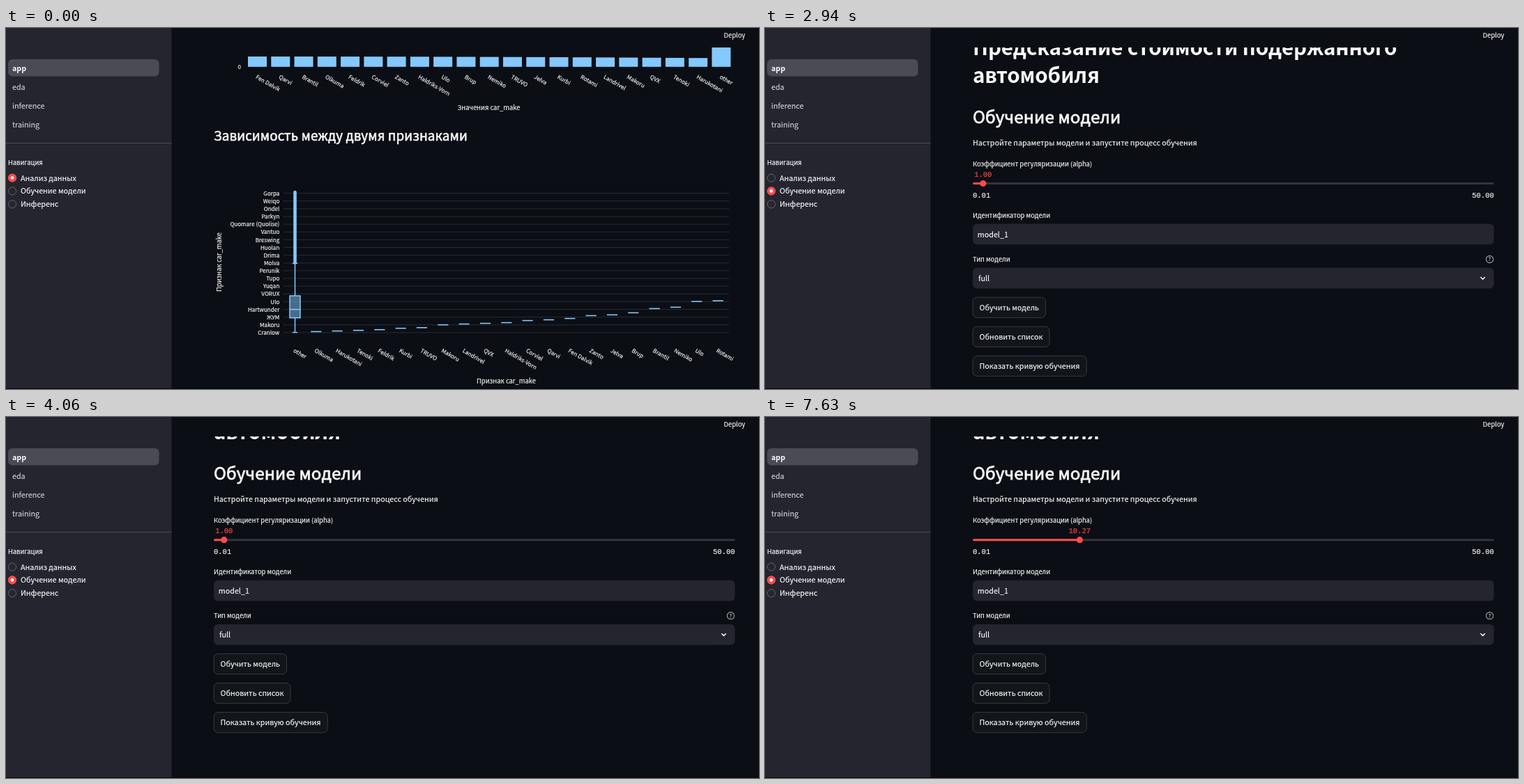
Recreate the animation shown at these times as an HTML page. Size 1080 px wide and 519 px high, loop 8000 ms.

```html
<!DOCTYPE html>
<html lang="ru">
<head>
<meta charset="utf-8">
<title>Анализ данных</title>
<style>
  html, body { margin: 0; width: 100%; height: 100%; overflow: hidden; background: #0b0e14; }
  svg { display: block; width: 1080px; height: 519px; }
  text { font-family: "Noto Sans CJK JP", "Noto Sans CJK SC", "Noto Sans", sans-serif;
         fill: #fafafa; stroke: #fafafa; stroke-width: .15px; white-space: pre; }
  .mono { font-family: "Liberation Mono", monospace; }
  .red { fill: #ff4b4b; stroke: #ff4b4b; }
  .dim { fill: #cfd0d4; stroke: #cfd0d4; }
  .head { stroke-width: .032em; letter-spacing: .005em; }
  .title { font-weight: 700; stroke: none; letter-spacing: -.005em; }
  .bold { font-weight: 700; stroke: none; }
</style>
</head>
<body>
<svg id="stage" viewBox="0 0 1080 519"></svg>
<script>
const NS = 'http://www.w3.org/2000/svg';
const LOOP = 8000, TICK = 70;
const BLUE = '#83c9ff', RED = '#ff4b4b', PANEL = '#24252f';
const GLYPH_SCALE = 1 / 1.117;
const stage = document.getElementById('stage');

function add(parent, tag, attrs = {}, content) {
  const node = document.createElementNS(NS, tag);
  for (const key in attrs) node.setAttribute(key, attrs[key]);
  if (content !== undefined) node.textContent = content;
  parent.appendChild(node);
  return node;
}
const rect = (p, x, y, width, height, fill, extra) =>
  add(p, 'rect', { x, y, width, height, fill, ...extra });
const line = (p, x1, y1, x2, y2, stroke, width = 1, extra) =>
  add(p, 'line', { x1, y1, x2, y2, stroke, 'stroke-width': width, ...extra });
const label = (p, x, y, size, content, extra) =>
  add(p, 'text', { x, y, 'font-size': size * GLYPH_SCALE, ...extra }, content);
const mono = (p, x, y, content, anchor, cls = '') =>
  add(p, 'text', { x, y, 'font-size': 10.5, class: 'mono ' + cls, 'text-anchor': anchor }, content);
const slanted = (p, x, y, content) =>
  label(p, 0, 0, 9, content, { transform: `translate(${x - 3} ${y}) rotate(30)` });

// Page area below the fixed header
const clip = add(add(stage, 'defs'), 'clipPath', { id: 'below' });
rect(clip, 238, 28, 842, 491);
const main = add(stage, 'g', { 'clip-path': 'url(#below)' });
const charts = add(main, 'g');
const form = add(main, 'g');

function drawBars() {
  const names = ['Fen Dalvik', 'Qarvi', 'Brantil', 'Olkuma', 'Feldrik', 'Corviel', 'Zanto',
    'Haldriks-Vorn', 'Ulo', 'Brup', 'Nemiko', 'TRUVO', 'Jelva', 'Kurbi', 'Rotami',
    'Landrivel', 'Makoru', 'QVX', 'Tenoki', 'Harukotani', 'other'];
  names.forEach((name, i) => {
    const x = 347 + 33.27 * i;
    const top = name === 'other' ? 28 : 41 + i * i * .006;
    rect(charts, x, top, 27, 55.8 - top, BLUE);
    slanted(charts, x + 13.5, 72, name);
  });
  label(charts, 337, 59.3, 9, '0', { 'text-anchor': 'end' });
  label(charts, 692.5, 117.5, 10.5, 'Значения car_make', { 'text-anchor': 'middle' });
}

function drawBoxes() {
  const rows = ['Gorpa', 'Weiqo', 'Ondel', 'Parkyn', 'Quomare (Quolise)', 'Vantuo', 'Breswing',
    'Huolan', 'Drima', 'Molva', 'Perunik', 'Tupo', 'Yuqan', 'VORUX', 'Ulo', 'Hartwunder',
    'ЖУМ', 'Makoru', 'Cranlow'];
  rows.forEach((name, i) => {
    const y = 237.6 + 11.13 * i;
    line(charts, 398, y, 1037, y, '#292b32');
    label(charts, 392.3, y + 3.2, 9, name, { 'text-anchor': 'end' });
  });

  const cols = [['Olkuma', 436.5], ['Harukotani', 435.6], ['Tenoki', 434.7], ['Feldrik', 433.7],
    ['Kurbi', 431.7], ['TRUVO', 430.8], ['Makoru', 426.7], ['Landrivel', 425.6], ['QVX', 424.6],
    ['Haldriks-Vorn', 423.6], ['Corviel', 420.6], ['Qarvi', 419.5], ['Fen Dalvik', 417.6],
    ['Zanto', 413.5], ['Jelva', 412.4], ['Brup', 409.4], ['Brantil', 403.4], ['Nemiko', 401.4],
    ['Ulo', 393.2], ['Rotami', 392.2]];
  const x0 = 414.5;
  cols.forEach(([name, y], i) => {
    const x = x0 + 30.33 * (i + 1);
    line(charts, x - 7.6, y, x + 7.6, y, BLUE, 1.6);
    slanted(charts, x, 465.5, name);
  });
  slanted(charts, x0, 465.5, 'other');

  line(charts, x0, 236, x0, 337.5, BLUE, 4.6, { 'stroke-linecap': 'round' });
  line(charts, x0, 338, x0, 385, BLUE, 1.5);
  line(charts, x0, 417, x0, 437.6, BLUE, 1.5);
  for (const y of [338.4, 437.6]) line(charts, x0 - 3.7, y, x0 + 3.7, y, BLUE, 1.5);
  rect(charts, x0 - 7.5, 385, 15, 31.7, BLUE, { 'fill-opacity': .5, stroke: BLUE, 'stroke-width': 1.5 });
  line(charts, x0 - 7.5, 404.6, x0 + 7.5, 404.6, BLUE, 1.5);

  const middle = { 'text-anchor': 'middle' };
  label(charts, 717.5, 511, 10.5, 'Признак car_make', middle);
  label(charts, 0, 0, 10.5, 'Признак car_make', { ...middle, transform: 'translate(308.5 336.5) rotate(-90)' });
}

function drawForm() {
  label(form, 298, 39.4, 33, 'Предсказание стоимости подержанного', { class: 'title' });
  label(form, 298, 79, 33, 'автомобиля', { class: 'title' });
  label(form, 298, 137, 27, 'Обучение модели', { class: 'head' });
  label(form, 298, 169, 12, 'Настройте параметры модели и запустите процесс обучения');
  label(form, 298, 199.3, 10.5, 'Коэффициент регуляризации (alpha)');

  rect(form, 298, 222, 747.5, 3, '#33353e', { rx: 1.5 });
  const fill = rect(form, 298, 222, 0, 3, RED, { rx: 1.5 });
  const thumb = add(form, 'circle', { cy: 223.5, r: 4.6, fill: RED });
  const value = mono(form, 0, 214.3, '', 'middle', 'red');
  mono(form, 298, 243.8, '0.01', 'start');
  mono(form, 1045.5, 243.8, '50.00', 'end');

  label(form, 298, 273, 10.5, 'Идентификатор модели');
  rect(form, 298, 281.5, 747.5, 29.7, PANEL, { rx: 6 });
  label(form, 304.8, 300.8, 12, 'model_1');

  label(form, 298, 336.2, 10.5, 'Тип модели');
  add(form, 'circle', { cx: 1039.4, cy: 332.5, r: 5.1, fill: 'none', stroke: '#a4a5aa', 'stroke-width': 1.1 });
  label(form, 1039.4, 335.4, 8.5, '?', { class: 'dim', 'text-anchor': 'middle' });
  rect(form, 298, 344.8, 747.5, 29.7, PANEL, { rx: 6 });
  label(form, 306, 364, 12, 'full');
  add(form, 'path', { d: 'M1026.3 358 l3.2 3.2 l3.2 -3.2', fill: 'none', stroke: '#fafafa', 'stroke-width': 1.5 });

  [['Обучить модель', 105], ['Обновить список', 110.5], ['Показать кривую обучения', 163.7]]
    .forEach(([name, width], i) => {
      const y = 387.2 + 42.1 * i;
      rect(form, 298, y, width - .5, 29.2, '#11161b', { rx: 6, stroke: '#3c4047', 'stroke-width': .9 });
      label(form, 307.5, y + 18.8, 12, name);
    });

  return v => {
    const x = 298 + (v - .01) / 49.99 * 747;
    fill.setAttribute('width', x - 298);
    thumb.setAttribute('cx', x);
    value.setAttribute('x', x);
    value.textContent = v.toFixed(2);
  };
}

function drawSidebar() {
  rect(stage, 0, 0, 237.5, 519, PANEL);
  rect(stage, 3, 45, 216.5, 24.4, '#4a4b54', { rx: 6 });
  ['app', 'eda', 'inference', 'training'].forEach((name, i) =>
    label(stage, 9, 61.7 + 27.1 * i, 12, name, { class: i ? 'dim' : 'bold' }));
  line(stage, 0, 165.5, 237.5, 165.5, '#4c4d56');
  label(stage, 3, 197, 10.5, 'Навигация');

  const radios = ['Анализ данных', 'Обучение модели', 'Инференс'].map((name, i) => {
    const cy = 215.5 + 18.9 * i;
    label(stage, 21, cy + 4, 12, name);
    add(stage, 'circle', { cx: 9, cy, r: 5.6, fill: '#25272e', stroke: '#6b6c73', 'stroke-width': .9 });
    const on = add(stage, 'g');
    add(on, 'circle', { cx: 9, cy, r: 6.1, fill: RED });
    add(on, 'circle', { cx: 9, cy, r: 2.3, fill: '#fafafa' });
    return on;
  });
  const arrow = add(stage, 'path', { d: 'M207.8 10 l-3.6 3.6 l3.6 3.6', fill: 'none', stroke: '#fafafa', 'stroke-width': 1.5 });
  return { radios, arrow };
}

drawBars();
label(charts, 298, 162, 21, 'Зависимость между двумя признаками', { class: 'head' });
drawBoxes();
const setSlider = drawForm();
const { radios, arrow } = drawSidebar();
label(stage, 1029.5, 14.4, 10.5, 'Deploy');
rect(stage, 0, 518, 1080, 1, '#06070a');

// Tracks of [time, value]
const ARROW = [[980, 0], [1050, 1], [2730, 1], [2940, 0]];
const SCROLL = [[3570, 0], [3640, -6], [3710, -22], [3780, -39], [3850, -46], [3990, -46], [4060, -46.8]];
const ALPHA = [[5530, 1], [5670, 3.2], [5810, 8], [5950, 12.2], [6090, 13.73], [6440, 13.73],
  [6510, 13.59], [7280, 10.98], [7630, 10.27]];

function at(track, t) {
  if (t <= track[0][0]) return track[0][1];
  const i = track.findIndex(key => key[0] > t);
  if (i < 0) return track[track.length - 1][1];
  const [t0, a] = track[i - 1], [t1, b] = track[i];
  return a + (b - a) * (t - t0) / (t1 - t0);
}
const show = (node, on) => node.setAttribute('visibility', on ? 'visible' : 'hidden');

function draw() {
  const now = performance.now() % LOOP;
  const t = Math.floor(now / TICK) * TICK;
  const training = t >= 2240;
  const picked = t >= 1960 ? 1 : 0;
  show(charts, !training);
  show(form, training);
  radios.forEach((on, i) => show(on, i === picked));
  arrow.setAttribute('opacity', at(ARROW, t));
  form.setAttribute('transform', `translate(0 ${at(SCROLL, t)})`);
  setSlider(at(ALPHA, t));
  requestAnimationFrame(draw);
}
draw();
</script>
</body>
</html>
```
